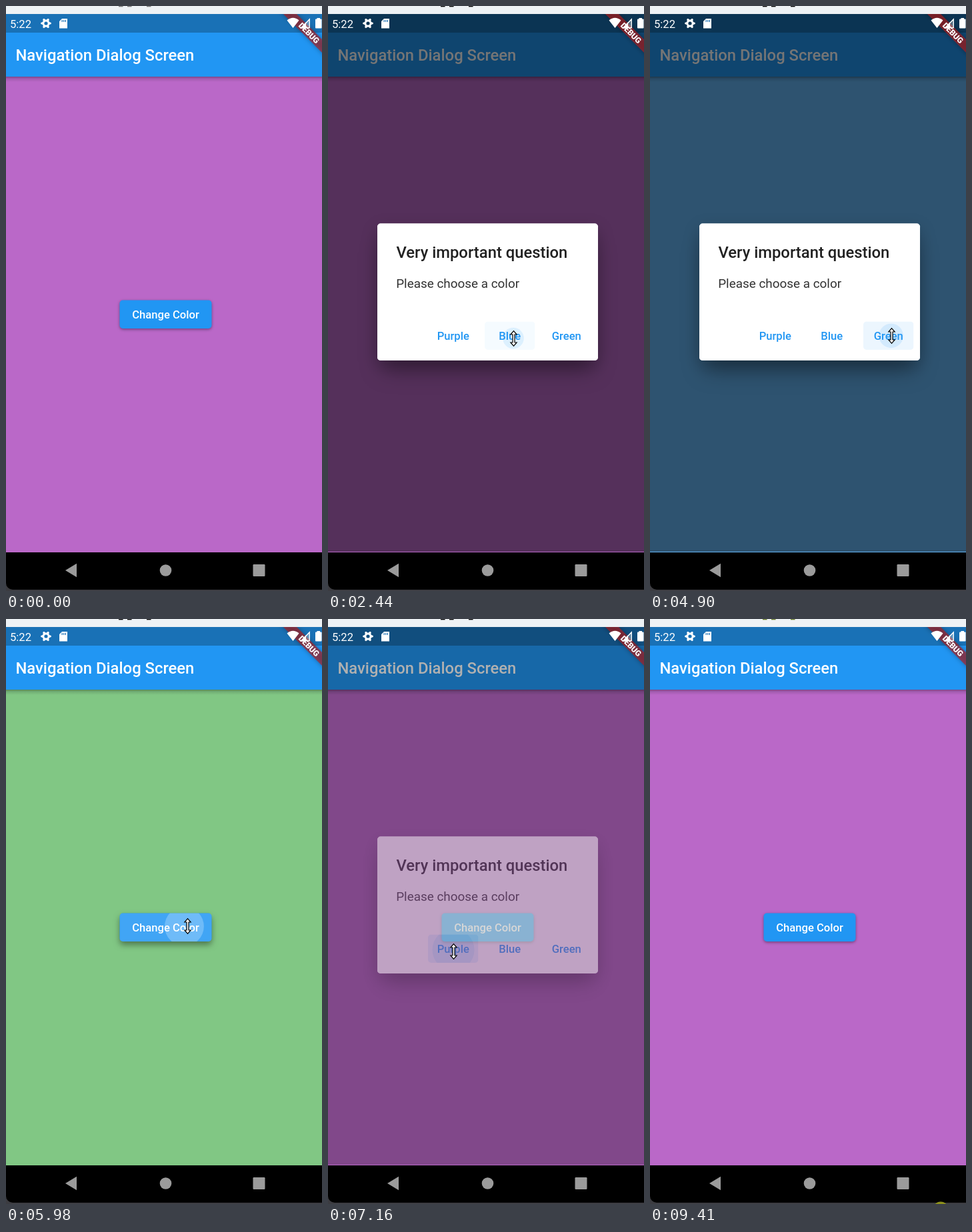
Write an HTML page with a canvas that moves like this. It is 474 px wide and 878 px high and loops after 9.47 s.

```html
<!DOCTYPE html>
<html lang="en">
<head>
<meta charset="utf-8">
<title>Navigation dialog</title>
<style>
  html, body { margin: 0; width: 100%; height: 100%; overflow: hidden; background: #000; }
  canvas { display: block; }
</style>
</head>
<body>
<canvas id="stage" width="474" height="878"></canvas>
<script>
const W = 474, H = 878, LOOP = 9470;
const PRIMARY = '#2196f3';
const PURPLE = '#ba68c8', BLUE = '#64b5f6', GREEN = '#81c784';

const stage = document.getElementById('stage').getContext('2d');
const layerCanvas = document.createElement('canvas');
layerCanvas.width = W;
layerCanvas.height = H;
const layer = layerCanvas.getContext('2d');

const changeButton = { x: 170.5, y: 441.5, w: 138, h: 42.5, label: 'Change Color' };
const choices = ['Purple', 'Blue', 'Green'].map((label, i) =>
  ({ x: 150 + 85 * i, y: 473.5, w: 75.5, h: 42.5, label }));

// One visit: press the page button, the dialog opens, press a choice, it closes.
const visits = [
  { down: 1160, up: 1350, open: 1420, choice: 1, pick: 2370, release: 2510, close: 2580, color: BLUE },
  { down: 3680, up: 3810, open: 3880, choice: 2, pick: 4765, release: 4950, close: 5020, color: GREEN },
  { down: 5860, up: 6050, open: 6120, choice: 0, pick: 6890, release: 7090, close: 7160, color: PURPLE }
];
const FADE = 70;

// time, x, y
const pointerPath = [
  [70, 368, 736], [960, 220, 462], [1820, 220, 462], [2300, 278.5, 499],
  [2920, 278.5, 499], [3390, 260.5, 467], [3520, 259, 465], [4150, 259, 465],
  [4630, 362.5, 495], [5300, 362.5, 495], [5580, 272.5, 461], [6250, 272.5, 461],
  [6750, 188.5, 499], [8230, 188.5, 499], [9070, 431, 892]
];

const clamp = v => Math.min(1, Math.max(0, v));
const mix = (a, b, k) => a + (b - a) * k;
const smooth = k => k * k * (3 - 2 * k);

function pointerAt(t) {
  const i = pointerPath.findIndex(p => p[0] > t);
  if (i < 1) return null;
  const [t0, x0, y0] = pointerPath[i - 1], [t1, x1, y1] = pointerPath[i];
  const k = smooth((t - t0) / (t1 - t0));
  return { x: mix(x0, x1, k), y: mix(y0, y1, k) };
}

function rect(c, x, y, w, h, color) {
  c.fillStyle = color;
  c.fillRect(x, y, w, h);
}

function rounded(c, x, y, w, h, r, color) {
  c.beginPath();
  c.roundRect(x, y, w, h, r);
  c.fillStyle = color;
  c.fill();
}

function poly(c, points, color) {
  c.beginPath();
  points.forEach(([x, y]) => c.lineTo(x, y));
  c.closePath();
  c.fillStyle = color;
  c.fill();
}

function disc(c, x, y, r, color) {
  c.beginPath();
  c.arc(x, y, r, 0, 2 * Math.PI);
  c.fillStyle = color;
  c.fill();
}

function text(c, str, x, y, size, weight, color, align = 'left') {
  c.font = `${weight} ${size}px Roboto, sans-serif`;
  c.textAlign = align;
  c.fillStyle = color;
  c.fillText(str, x, y);
}

function withShadow(c, dy, blur, alpha, draw) {
  c.save();
  c.shadowColor = `rgba(0,0,0,${alpha})`;
  c.shadowOffsetY = dy;
  c.shadowBlur = blur;
  draw();
  c.restore();
}

// Highlight and ripple of a button held from down to up.
function ink(c, b, t, down, up, rgb, strength) {
  if (t < down || t > up + 375) return;
  const fadeOut = 1 - clamp((t - up - 225) / 150);
  const light = strength * clamp((t - down) / 200) * fadeOut;
  const u = clamp((Math.min(t, up) - down) / 1000 + Math.max(0, t - up) / 225);
  const p = 1 - Math.pow(1 - u, 1.3);
  const touch = pointerAt(down);
  c.save();
  c.beginPath();
  c.roundRect(b.x, b.y, b.w, b.h, 4.7);
  c.clip();
  rect(c, b.x, b.y, b.w, b.h, `rgba(${rgb},${light})`);
  disc(c, mix(touch.x, b.x + b.w / 2, p), mix(touch.y, b.y + b.h / 2, p),
    Math.hypot(b.w, b.h) / 2 * (0.3 + 0.7 * p),
    `rgba(${rgb},${strength * clamp((t - down) / 75) * fadeOut})`);
  c.restore();
}

function drawPage(c, t, color) {
  rect(c, 0, 12, W, 808, color);
  const g = c.createLinearGradient(0, 106, 0, 114);
  g.addColorStop(0, 'rgba(0,0,0,0.32)');
  g.addColorStop(0.4, 'rgba(0,0,0,0.12)');
  g.addColorStop(1, 'rgba(0,0,0,0)');
  rect(c, 0, 106, W, 8, g);
  rect(c, 0, 12, W, 94, PRIMARY);
  rect(c, 0, 12, W, 28, 'rgba(0,0,0,0.25)');
  text(c, 'Navigation Dialog Screen', 14.4, 82, 23.8, 500, '#fff');

  const b = changeButton;
  const held = visits.find(v => t >= v.down && t < v.open + FADE);
  const lift = held ? clamp((t - held.down) / 120) : 0;
  withShadow(c, mix(1.5, 5, lift), mix(4, 10, lift), 0.4,
    () => rounded(c, b.x, b.y, b.w, b.h, 4.7, PRIMARY));
  if (held) ink(c, b, t, held.down, held.up, '255,255,255', 0.24);
  text(c, b.label, b.x + b.w / 2, 468.5, 16.6, 500, '#fff', 'center');
}

function drawDialog(c, t, visit) {
  c.clearRect(0, 0, W, H);
  const box = inset => rounded(c, 74 + inset, 326.5 + inset, 331 - 2 * inset, 205.5 - 2 * inset, 4.7, '#fff');
  withShadow(c, 22, 34, 0.34, () => box(8));
  withShadow(c, 8, 26, 0.2, () => box(0));
  box(0);
  text(c, 'Very important question', 102.4, 378, 23.8, 500, '#212121');
  text(c, 'Please choose a color', 102.2, 423, 18.9, 400, '#333');
  ink(c, choices[visit.choice], t, visit.pick, visit.release, '33,150,243', 0.12);
  choices.forEach(b => text(c, b.label, b.x + b.w / 2, 500.5, 16.6, 500, PRIMARY, 'center'));
}

function drawBanner(c) {
  c.save();
  c.beginPath();
  c.rect(0, 12, W, 200);
  c.clip();
  c.translate(454.5, 40.5);
  c.rotate(Math.PI / 4);
  withShadow(c, 0, 7, 0.5, () => rect(c, -70, -7.1, 140, 14.2, 'rgba(183,28,28,0.63)'));
  text(c, 'DEBUG', 0, 4.3, 12, 900, '#fff', 'center');
  c.restore();
}

function drawGear(c, x, y) {
  c.beginPath();
  for (let i = 0; i < 24; i++) {
    const a = (i - 0.5) * Math.PI / 12, r = i % 4 < 2 ? 7.8 : 5.5;
    c.lineTo(x + r * Math.cos(a), y + r * Math.sin(a));
  }
  c.closePath();
  c.moveTo(x + 2.6, y);
  c.arc(x, y, 2.6, 0, 2 * Math.PI);
  c.fillStyle = '#fff';
  c.fill('evenodd');
}

function drawStatus(c) {
  text(c, '5:22', 6, 32.5, 16.6, 400, '#fff');
  drawGear(c, 60, 26);
  poly(c, [[84, 19], [92, 19], [92, 33.5], [80, 33.5], [80, 23]], '#fff');
  for (let i = 0; i < 3; i++) rect(c, 83.6 + 2.6 * i, 20.8, 1.2, 3.2, '#1970b6');

  c.beginPath();
  c.moveTo(430.5, 33);
  c.lineTo(421.5, 21.5);
  c.quadraticCurveTo(430.5, 14, 439.5, 21.5);
  c.closePath();
  c.fillStyle = '#fff';
  c.fill();

  poly(c, [[441, 33.5], [456, 33.5], [456, 18]], 'rgba(255,255,255,0.3)');
  poly(c, [[441, 33.5], [450, 33.5], [450, 24.2]], '#fff');
  c.beginPath();
  c.moveTo(443, 32.8);
  c.lineTo(455.2, 32.8);
  c.lineTo(455.2, 20);
  c.closePath();
  c.strokeStyle = '#fff';
  c.lineWidth = 1.4;
  c.stroke();

  rounded(c, 464, 19.5, 9.5, 14, 1, '#fff');
  rect(c, 466.5, 18, 4.5, 2, '#fff');
}

function drawFrame(c, t) {
  rect(c, 0, 0, W, 12, '#eef2f5');
  const ink = t < 70 ? '#777' : t < 9340 ? '#000' : '#6b7d2a';
  [169, 182, 211].forEach(x => rect(c, x, 0, 6.5, 1.3, ink));

  rect(c, 0, 819, W, 59, '#3c3c41');
  rounded(c, 0, 819, W + 20, 57, [0, 0, 0, 10], '#000');
  const grey = '#9b9b9b';
  poly(c, [[89, 847], [106, 836.8], [106, 857.2]], grey);
  disc(c, 239.5, 847, 8.8, grey);
  rounded(c, 370.5, 838, 18, 18, 1.2, grey);
}

function drawPointer(c, { x, y }) {
  c.save();
  c.translate(x, y);
  c.beginPath();
  for (const s of [1, -1]) {
    [[-1.5, -6], [-4.6, -6], [0, -11.3], [4.6, -6], [1.5, -6]]
      .forEach(([px, py]) => c.lineTo(px * s, py * s));
  }
  c.closePath();
  c.fillStyle = '#fff';
  c.strokeStyle = '#000';
  c.lineWidth = 1.2;
  c.fill();
  c.stroke();
  c.restore();
}

function draw(t) {
  const c = stage;
  const past = visits.filter(v => t >= v.close);
  drawFrame(c, t);
  drawPage(c, t, past.length ? past[past.length - 1].color : PURPLE);

  const visit = visits.find(v => t >= v.open && t < v.close + FADE);
  if (visit) {
    const full = t >= visit.open + FADE && t < visit.close;
    rect(c, 0, 12, W, 807, `rgba(0,0,0,${full ? 0.54 : 0.31})`);
    drawDialog(layer, t, visit);
    c.globalAlpha = full ? 1 : 0.49;
    c.drawImage(layerCanvas, 0, 0);
    c.globalAlpha = 1;
  }

  drawBanner(c);
  drawStatus(c);
  const pointer = pointerAt(t);
  if (pointer) drawPointer(c, pointer);
  if (t >= 9340) disc(c, 436, 886, 11.5, '#8c8f1c');
}

const start = performance.now();
function tick() {
  draw((performance.now() - start) % LOOP);
  requestAnimationFrame(tick);
}
tick();
</script>
</body>
</html>
```
